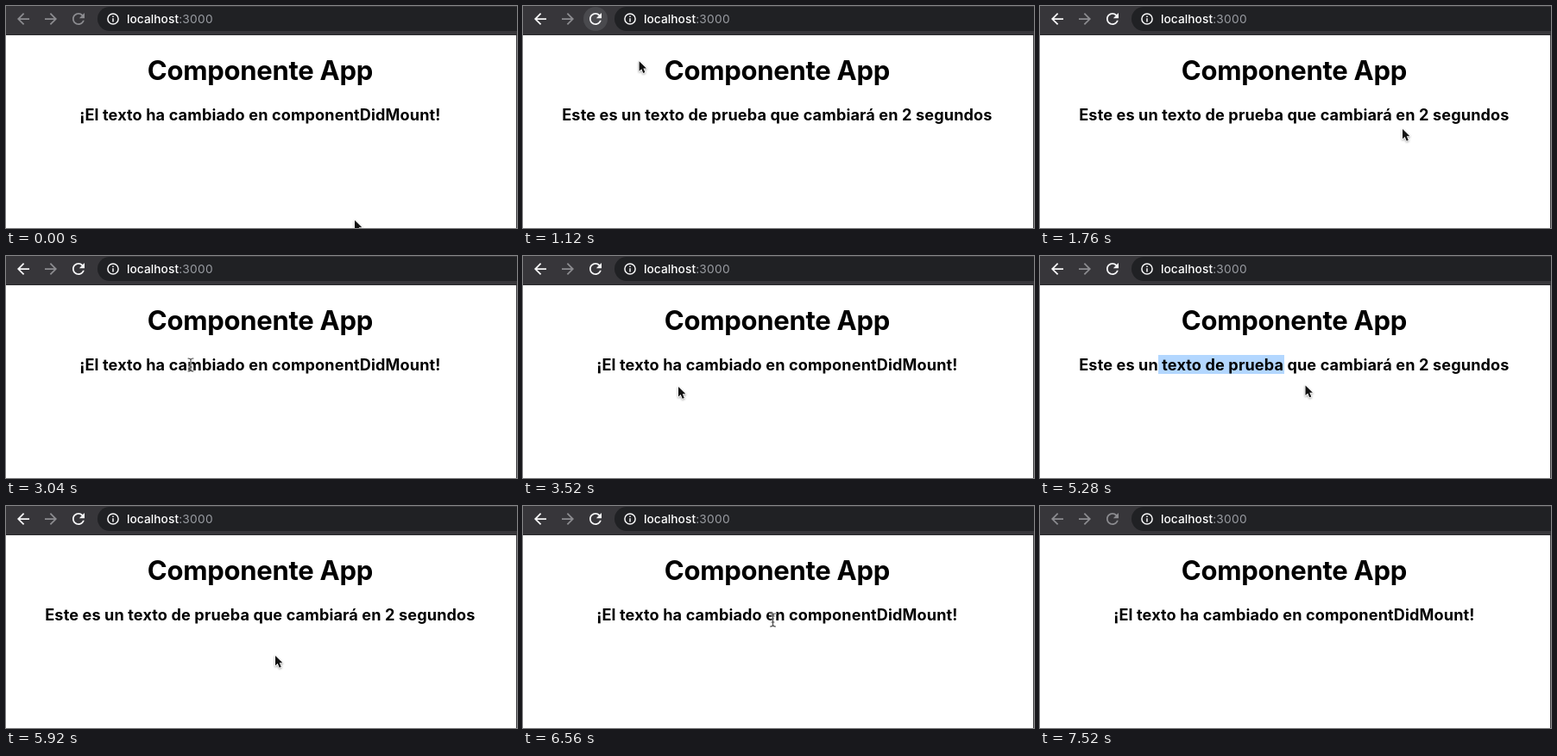
An HTML page for the animation above (7.68 s loop, 592 px wide and 258 px high).

```html
<!DOCTYPE html>
<html lang="es">
<head>
<meta charset="utf-8">
<title>Componente App</title>
<style>
  html, body { margin: 0; width: 100%; height: 100%; overflow: hidden; background: #fff; }
  svg { display: block; width: 592px; height: 258px; }
  text { font-family: Inter, "Open Sans", sans-serif; font-optical-sizing: none; white-space: pre; }
  .title { font-size: 31px; font-weight: 700; letter-spacing: -.0085em; text-anchor: middle; }
  .sub { font-size: 18.1px; font-weight: 700; letter-spacing: .007em; text-anchor: middle; }
  .url { font-size: 13.7px; font-weight: 500; letter-spacing: .005em; fill: #fff; }
  .port { font-weight: 400; letter-spacing: .02em; fill: #9a9da3; }
  .arrow { filter: drop-shadow(0 1px 1px rgba(0, 0, 0, .35)); }
</style>
</head>
<body>
<svg viewBox="0 0 592 258">
  <defs>
    <path id="back" d="M20 11H7.83l5.59-5.59L12 4l-8 8 8 8 1.41-1.41L7.83 13H20z"/>
    <path id="caret" d="M-3-7.5Q0-7.5 0-5.5Q0-7.5 3-7.5M0-5.5V5.5M-3 7.5Q0 7.5 0 5.5Q0 7.5 3 7.5M-1.5 2.5H1.5"/>
  </defs>

  <rect width="592" height="258" fill="#fff"/>
  <rect width="592" height="34" fill="#37363a"/>
  <rect y="33" width="592" height="1" fill="#2a2a2d"/>
  <rect x="106" y="1" width="520" height="28" rx="14" fill="#202124"/>
  <rect x="591" y="34" width="1" height="224" fill="#3c3c3e"/>

  <circle id="hover" cx="84" cy="15" r="14" fill="#4a4a4e"/>
  <g id="backIcon"><use href="#back" transform="translate(9.5 4.5) scale(.875)"/></g>
  <use href="#back" transform="translate(62.5 4.5) scale(-.875 .875)" fill="#8c8c90"/>
  <path id="reload" transform="translate(73.5 4.5) scale(.875)" d="M17.65 6.35C16.2 4.9 14.21 4 12 4c-4.42 0-7.99 3.58-7.99 8s3.57 8 7.99 8c3.73 0 6.84-2.55 7.73-6h-2.08c-.82 2.33-3.04 4-5.65 4-3.31 0-6-2.69-6-6s2.69-6 6-6c1.66 0 3.14.69 4.22 1.78L13 11h7V4z"/>

  <g fill="none" stroke="#f8f8f9" stroke-width="1.5">
    <circle cx="124" cy="15" r="6.1"/>
    <path d="M124 14.2v4.2M124 11.4v1.6"/>
  </g>
  <text class="url" x="140" y="20">localhost<tspan class="port">:3000</tspan></text>

  <rect id="mark" x="137" y="115" height="22" fill="#b3d7ff"/>
  <text class="title" x="294.4" y="86.4">Componente App</text>
  <text class="sub" id="sub" x="294.4" y="133"></text>

  <g id="arrow" class="arrow">
    <path d="M0 0V11.6L2.7 9.1 4.7 13.8 6.8 12.9 4.8 8.3H8.4z" fill="#111" stroke="#fff" stroke-width="1.6" paint-order="stroke" stroke-linejoin="round"/>
  </g>
  <g id="beam" fill="none" stroke-linecap="round">
    <use href="#caret" stroke="#fff" stroke-opacity=".7" stroke-width="2.4"/>
    <use href="#caret" stroke="#444" stroke-width="1.1"/>
  </g>
</svg>
<script>
  const STEP = 160, LOOP = 7680;
  const el = id => document.getElementById(id);
  const BEFORE = "Este es un texto de prueba que cambiará en 2 segundos";
  const AFTER = "¡El texto ha cambiado en componentDidMount!";

  // Each row holds from its step until the next row.
  const pointer = [
    [0, "arrow", 404, 249], [1, "arrow", 330, 190], [2, "arrow", 160, 60], [3, "arrow", 85, 14],
    [7, "arrow", 134.6, 64.2], [8, "arrow", 230, 98], [9, "beam", 330, 126],
    [10, "arrow", 400, 142], [11, "arrow", 420, 143],
    [17, "arrow", 400, 140], [18, "beam", 310, 131], [19, "beam", 214, 126.5],
    [20, "beam", 204, 130], [21, "arrow", 188, 145], [22, "arrow", 180, 152],
    [23, "arrow", 160, 108], [24, "arrow", 115, 52], [25, "arrow", 88, 21],
    [27, "arrow", 154.5, 140.5], [28, "arrow", 162, 168], [29, "arrow", 158, 174],
    [30, "beam", 138, 128], [31, "beam", 200, 123], [32, "beam", 283, 119],
    [33, "arrow", 307.5, 150.5], [34, "arrow", 312, 168], [35, "arrow", 314, 173],
    [36, "arrow", 313, 174], [37, "arrow", 312, 174],
    [40, "arrow", 298, 152], [41, "beam", 289.5, 132.5], [42, "beam", 296, 134],
    [43, "arrow", 330, 150], [44, "arrow", 370, 170], [45, "none"]
  ];
  const texts = [[0, AFTER], [4, BEFORE], [16, AFTER], [26, BEFORE], [39, AFTER]];
  const hovers = [[0, 0], [3, 1], [8, .4], [9, 0], [25, 1], [27, .4], [28, 0]];
  const marks = [[0, 0], [31, 63], [32, 146], [36, 0]];
  const icons = [[0, "#8c8c90"], [4, "#f8f8f9"], [47, "#8c8c90"]];

  const at = (rows, n) => rows.findLast(r => r[0] <= n);
  let last = -1;

  function draw(n) {
    const [, kind, x, y] = at(pointer, n);
    for (const id of ["arrow", "beam"]) {
      const on = id === kind;
      el(id).style.display = on ? "" : "none";
      if (on) el(id).setAttribute("transform", `translate(${x} ${y})`);
    }
    el("sub").textContent = at(texts, n)[1];
    el("hover").setAttribute("opacity", at(hovers, n)[1]);
    el("mark").setAttribute("width", at(marks, n)[1]);
    for (const id of ["backIcon", "reload"]) el(id).setAttribute("fill", at(icons, n)[1]);
  }

  const start = performance.now();
  function tick() {
    const n = Math.floor((performance.now() - start) % LOOP / STEP);
    if (n !== last) draw(last = n);
    requestAnimationFrame(tick);
  }
  tick();
</script>
</body>
</html>
```
